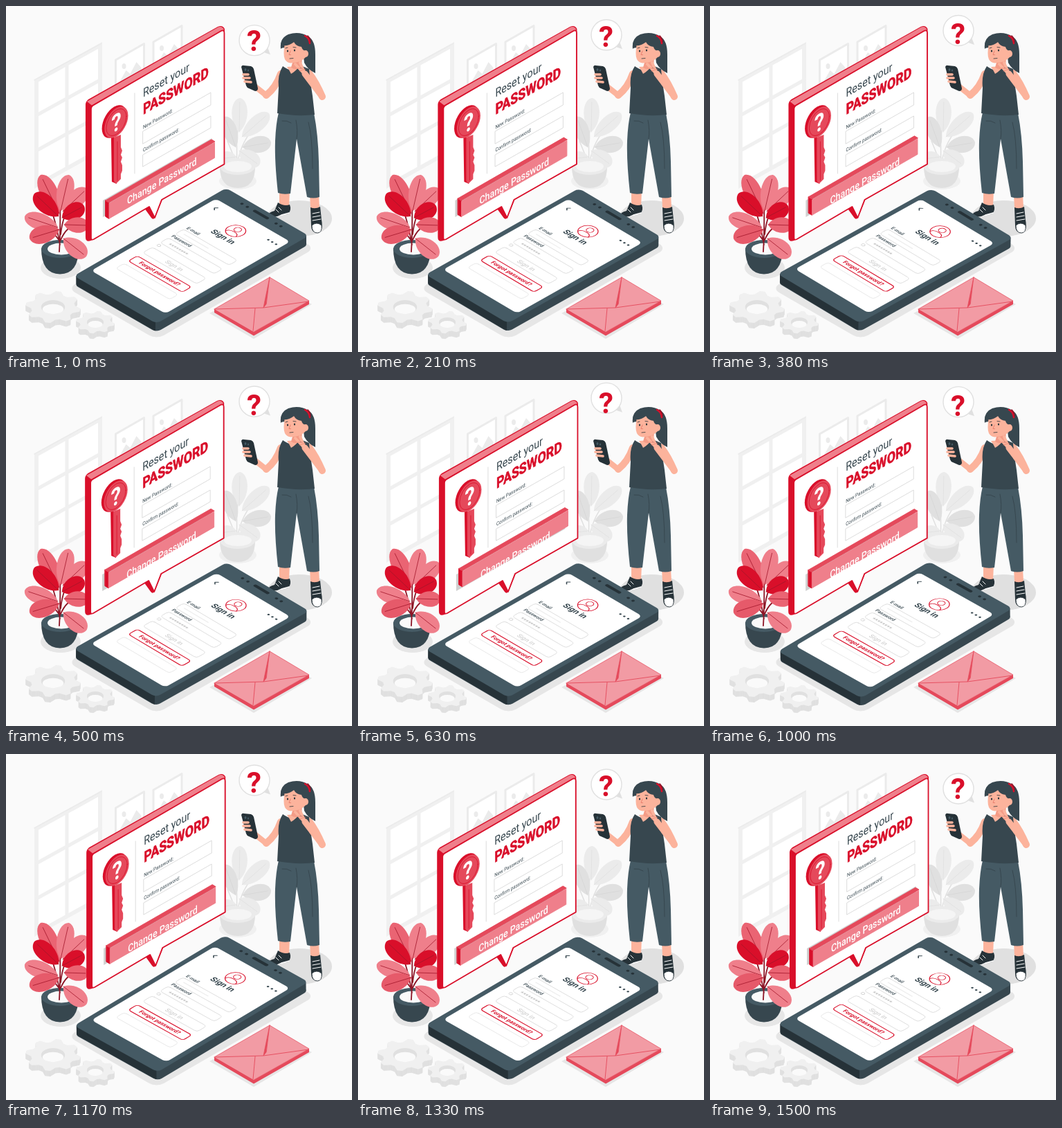
Animation of 500 by 500 pixels, one loop 1540 ms. Source, as an HTML page:

```html
<!DOCTYPE html>
<html lang="en">
<head>
<meta charset="utf-8">
<title>Reset your password</title>
<style>
  html, body { margin: 0; width: 100%; height: 100%; overflow: hidden; background: #fafafa; }
  svg { display: block; width: 100vw; height: 100vh; font-family: Roboto, sans-serif; }
</style>
</head>
<body>
<svg id="stage" viewBox="0 0 500 500" fill="none" stroke-linejoin="round" stroke-linecap="round"></svg>
<script>
const RED = '#d90f2a', ROSE = '#ef7f8b', MID = '#e5495b', SLATE = '#455a64', DARK = '#37474f',
  INK = '#263238', SKIN = '#fcb39c', PALE = '#ebebeb', GREY = '#e0e0e0';

// Isometric planes: the upright card and the ground
const wall = (x, y) => `transform="matrix(.83 -.478 0 1 ${x} ${y})"`;
const floor = (x, y) => `transform="matrix(.866 .5 -.866 .5 ${x} ${y})"`;

const shape = (d, fill, extra = '') => `<path d="${d}" fill="${fill}" ${extra}/>`;
const line = (d, stroke, width = 1) => `<path d="${d}" stroke="${stroke}" stroke-width="${width}"/>`;
const oval = (x, y, rx, ry, fill, extra = '') =>
  `<ellipse cx="${x}" cy="${y}" rx="${rx}" ry="${ry}" fill="${fill}" ${extra}/>`;
const box = (x, y, w, h, r, fill, extra = '') =>
  `<rect x="${x}" y="${y}" width="${w}" height="${h}" rx="${r}" fill="${fill}" ${extra}/>`;
const wallText = (x, y, size, text, fill, weight = 400) =>
  `<text ${wall(x, y)} font-size="${size}" font-weight="${weight}" fill="${fill}">${text}</text>`;
const label = (x, y, size, text, fill, weight = 400, anchor = 'middle') =>
  `<text x="${x}" y="${y}" font-size="${size}" font-weight="${weight}" fill="${fill}" text-anchor="${anchor}">${text}</text>`;

function leaf(x1, y1, x2, y2, w, fill, vein) {
  const dx = x2 - x1, dy = y2 - y1, len = Math.hypot(dx, dy);
  const at = (k, side) => `${x1 + dx * k - dy / len * side} ${y1 + dy * k + dx / len * side}`;
  return shape(`M${x1} ${y1}C${at(.25, w)} ${at(.95, w)} ${x2} ${y2}C${at(.95, -w)} ${at(.25, -w)} ${x1} ${y1}`, fill)
    + line(`M${x1} ${y1}L${at(.88, 0)}`, vein, .8);
}

function gear(cx, cy, r, teeth) {
  const pts = [];
  for (let i = 0; i < teeth * 4; i++) {
    const a = (i + .5) / (teeth * 4) * 2 * Math.PI, k = i % 4 < 2 ? r : r * .8;
    pts.push(`${cx + k * Math.cos(a)} ${cy + k * .58 * Math.sin(a)}`);
  }
  const rim = `M${pts.join('L')}Z`;
  let out = '';
  for (let h = 8; h > 0; h--) out += shape(rim, GREY, `transform="translate(0 ${h})"`);
  return out + shape(rim, '#f0f0f0') + oval(cx, cy, r * .43, r * .25, GREY)
    + oval(cx, cy + 3, r * .38, r * .18, '#fafafa');
}

function picture(x, y) {
  return shape(`M${x} ${y}l41-23.500v60l-41 23.500z`, '#fff', `stroke="${PALE}" stroke-width="3"`)
    + shape(`M${x + 6} ${y + 31}l9-16 6 5 9-17 7 8v20l-31 18z`, PALE)
    + oval(x + 12, y + 9, 3, 4, PALE);
}

const room = () =>
  shape('M44 108L136 57V208L44 259Z', '#fff', `stroke="#f0f0f0" stroke-width="6" stroke-linejoin="miter"`)
  + line('M88 84V234M44 158L136 107M44 209L136 158', '#f0f0f0', 5)
  + line('M41 107L138 54', PALE, 1.500)
  + picture(158.500, 78) + picture(213, 52);

const greyPlant = () =>
  line('M335 236Q331 200 337 165M335 225Q340 195 362 172M335 228Q345 208 365 200M335 232Q326 210 320 195', GREY, 1.500)
  + leaf(337, 182, 338, 133, 15, PALE, GREY) + leaf(341, 189, 380, 155, 15, PALE, GREY)
  + leaf(332, 204, 316, 160, 14, GREY, '#d6d6d6') + leaf(342, 204, 383, 197, 16, GREY, '#d6d6d6')
  + leaf(337, 209, 366, 230, 15, PALE, GREY) + leaf(333, 218, 308, 221, 13, PALE, GREY)
  + oval(335, 253, 27, 12, '#f0f0f0')
  + shape('M309 232Q309 263 335 263Q360 263 360 232Z', GREY)
  + oval(334.500, 232, 25.500, 12, PALE) + oval(335, 232, 20, 8, '#f5f5f5');

const redPlant = () =>
  oval(79, 378, 29, 16, '#e6e6e6')
  + shape('M51 350Q51 387 78 387.500Q105 387 105 350Z', DARK)
  + oval(78, 351, 27, 13, SLATE) + oval(80, 351, 20, 8.500, '#fafafa')
  + line('M77 355Q79 320 78 270M78 345Q72 310 60 278M79 330Q82 300 98 280M78 340Q62 318 46 308M79 338Q88 318 100 318', '#8d1425', 1.800)
  + [[77, 300, 50, 244, 17, '#ea6473'], [79, 296, 91, 244, 16, ROSE], [82, 297, 117, 264, 16, ROSE],
     [76, 304, 41, 271, 17, RED], [81, 306, 113, 289, 16, RED], [75, 320, 27, 304, 16, ROSE],
     [77, 323, 34, 336, 17, '#e65a6a'], [84, 316, 119, 317, 15, '#ea6473'], [83, 336, 116, 362, 17, ROSE]]
    .map(a => leaf(...a, '#a3162a')).join('');

const key = () =>
  shape('M152 190L158 190V250L160 257L153 254Z', RED)
  + `<circle ${wall(156.500, 167)} r="21.500" fill="${RED}"/>`
  + shape('M156 190L166 186V204L168 209L166 215L168 219L166 225L168 230V238L166 243V250L159 257L156 253Z', MID)
  + line('M161 196V252', RED, .8)
  + `<circle ${wall(159.500, 168)} r="20.500" fill="${MID}"/>`
  + `<circle ${wall(159.500, 168)} r="17.500" stroke="${RED}" stroke-width=".8"/>`
  + `<text ${wall(159.500, 180.500)} font-size="35" font-weight="700" text-anchor="middle" fill="#fff">?</text>`;

const card = () =>
  shape('M115 143Q115 138 119 135L306 30Q313 27 316 33V229L226 280L216 305Q213 310 210 306L201 293.500L123 339Q115 342 115 334Z', RED)
  + shape('M117 138L307 30.500Q312 28.500 315 34L124 143.500Z', ROSE)
  + shape('M123 149Q123 145 127 143L311 36Q315.500 34 315.500 39V228.500L225 280L215 306L207 290L127 337Q123 339 123 335Z', '#fff', `stroke="${RED}" stroke-width="1.800"`)
  + line('M186 126V242', '#dcdcdc')
  + line('M198 181L296 125V143L198 199ZM198 215L296 159V176L198 232Z', '#d4d4d4', .8)
  + wallText(198, 132, 17.200, 'Reset your', DARK)
  + `<g stroke="${RED}" stroke-width=".6">${wallText(198, 157, 21.500, 'PASSWORD', RED, 700)}</g>`
  + wallText(198, 178, 7.500, 'New Password:', DARK) + wallText(198, 211, 7.500, 'Confirm password:', DARK)
  + key()
  + shape('M140 281L297.500 191V215L140 305Z', '#d0d0d0')
  + `<g id="button">`
  + shape('M144 281L149 284V307.500L144 304.500Z', RED, `stroke="${RED}"`)
  + shape('M144 281L297 193L302 196L149 284Z', MID, `stroke="${MID}"`)
  + shape('M149.500 285L301.500 197.500V219.500L149.500 307Z', ROSE, `stroke="${ROSE}"`)
  + `</g>` + wallText(175, 287, 15, 'Change Password', '#fff', 500);

const field = (y, h, color, width = .8) => box(26, y, 90, h, 4, 'none', `stroke="${color}" stroke-width="${width}"`);

const phone = () =>
  `<g ${floor(318, 275.500)}>${box(0, 0, 138, 254, 7, DARK)}</g>`
  + shape('M101.500 390L434 332V344.500L216 467L101.500 402.500Z', DARK)
  + shape('M101.500 390L216 457V469.500Q214 469 211 467L104 405Q101.500 404 101.500 401Z', INK)
  + `<g ${floor(318, 263)}>` + box(0, 0, 138, 254, 7, SLATE) + box(7, 24, 124, 208, 6, '#fff') + `</g>`
  + `<g ${floor(318, 261)}>`
  + box(57, 9, 25, 4.500, 2, INK)
  + [38, 47, 95, 103].map(x => oval(x, 11.500, 2, 2, INK)).join('')
  + line('M24 37.500L21 40.500L24 43.500', DARK, 1.300)
  + [112, 118.500, 125].map(x => oval(x, 41.500, 1.500, 1.500, DARK)).join('')
  + `<g stroke="${RED}">` + oval(72, 56, 12, 12, '#fff') + oval(72, 52.500, 4.500, 4.500, 'none')
  + `<path d="M63.500 64Q64 58.500 72 58.500T80.500 64"/></g>`
  + label(70, 79, 11.800, 'Sign in', DARK, 600)
  + label(27, 94, 7, 'E-mail', DARK, 500, 'start') + field(97, 14, '#dadada') + line('M34 104H74', '#eee', 1.500)
  + label(26, 118, 7, 'Password', DARK, 500, 'start') + field(122, 14, '#dadada')
  + label(35, 134, 9, '********', '#b8b8b8', 400, 'start')
  + oval(29, 141, 2.300, 2.300, 'none', 'stroke="#ccc" stroke-width=".7"')
  + field(149, 16, '#dadada') + label(71, 160.500, 9, 'Sign in', '#d2d2d2', 500)
  + field(174, 15, RED, 1.300) + label(70.500, 184, 8.200, 'Forgot password?', RED, 700)
  + field(196, 14, '#e6e6e6')
  + `</g>`;

const envelope = () =>
  shape('M294 444L380 397L442 431L358 481Z', '#e6e6e6')
  + shape('M301 438L358 471L438 426V431L358 476.500L301 443Z', MID)
  + shape('M301 438L381 392L438 426L358 471Z', '#f29ba4', `stroke="${MID}" stroke-width=".7"`)
  + line('M302 438L372 436L437 427M357 470L360 437', MID, .9)
  + shape('M381 392L372 436L376 431Z', MID, `stroke="${MID}" stroke-width=".7"`);

const shoes = () =>
  shape('M393 284Q402 290 410 287Q413 295 408 300L398 302Q388 309 379 303Q379 298 388 296Z', INK)
  + line('M379 303.500Q388 308 398 302L409 299', '#fff', 1.400)
  + line('M390 294L394 298M394 291L398 295', '#fff')
  + shape('M440 291Q447 294 454 290L456 309Q459 326 450 328Q441 328 441 317Z', INK)
  + shape('M442 317Q449 311 456 317Q457 328 450 328Q442 328 442 317Z', '#fff', `stroke="${INK}" stroke-width=".8"`)
  + line('M443 300L453 298M443 305L454 303M443 310L455 308', '#fff');

const head = () =>
  shape('M397 61Q396 46 408 41Q424 36 437 44Q447 50 447 70V97Q436 92 431 82L428 56Z', DARK)
  + shape('M415 78L428 74L427 88Q420 94 412 89Z', '#f49c87')
  + shape('M403 54Q400 71 403 77Q407 84 415 82Q427 81 433 74L431 50Z', SKIN)
  + shape('M397 62Q395 45 411 41Q430 37 437 49Q439 60 433 65Q428 64 427 59Q419 58 416 52Q409 58 402 57Z', DARK)
  + oval(433, 69, 4, 5, SKIN)
  + line('M432 43Q438 46 439 54', RED, 2.500) + line('M436 43Q440 47 440 52', '#9d1024', 1.500)
  + oval(407, 65, 1.100, 1.600, INK) + oval(417, 64, 1.100, 1.600, INK)
  + line('M404 61L407 60M415 59.500L419 60M410 76L415 75.500', INK, .8)
  + line('M411 65L409 70.500H411.500', '#e8806f', 1);

const woman = () =>
  oval(424, 307, 47, 26, '#e0e0e0')
  + shape('M395 266H410L409 290Q401 292 395 285Z', SKIN) + shape('M439 272H452L453 292Q446 296 440 292Z', SKIN) + shoes()
  + shape('M394 154L445 155Q451 185 452 225L453 276Q444 279 435 276L420 192L411 271Q401 273 393 270Q388 225 389 195Q390 170 394 154Z', SLATE)
  + line('M420 192Q422 180 419 165M399 166Q406 165 412 169M437 168Q443 190 443 235', DARK, 1)
  + line('M397 98Q390 118 376 129', SKIN, 10) + line('M376 129L352 110', SKIN, 8)
  + shape('M340 88Q341 85 344 86L354 87Q357 88 358 91L364 119Q364 123 360 123L351 119Q348 118 347 115Z', INK)
  + oval(346, 92, 1.500, 2, SLATE) + oval(350, 93, 1.200, 1.500, SLATE)
  + line('M343 99L350 99M343 104L352 104M345 109L354 110', SKIN, 3.600)
  + line('M438 97Q448 110 457 131', SKIN, 10)
  + shape('M400 87Q407 92 413 93Q420 92 426 86L438 91Q439 105 443 130L446 157Q421 160 392 155L394 118Q392 99 400 87Z', DARK)
  + shape('M406 88Q409 92 412 98Q419 94 424 87Z', SKIN)
  + head()
  + line('M457 131L432 98', SKIN, 9) + line('M430 97L418 84M431 95L425 82', SKIN, 4)
  + line('M421 90L429 90M424 94L433 91', '#e8806f', .7);

const bubble = () =>
  `<g id="bubble">`
  + shape('M372 67L382 70.500L378 60Z', GREY)
  + oval(359, 50, 22, 22, '#fff', `stroke="${GREY}" stroke-width="1.400"`) + `</g>`
  + `<text id="mark" x="358.500" y="65" font-size="42" font-weight="700" text-anchor="middle" fill="${RED}">?</text>`;

const $ = id => document.getElementById(id);
$('stage').innerHTML = room() + greyPlant() + redPlant()
  + `<g ${floor(318, 280)}>${box(-4, -4, 148, 264, 12, '#e6e6e6')}</g>`
  + gear(68, 435, 40, 8) + gear(129, 457, 28, 8)
  + woman() + `<g id="card">${card()}</g><g id="phone">${phone()}</g>` + envelope() + bubble();

const LOOP = 1540, CYCLE = 1500;
const SHAKE = [0, -1, 2, -4, 4, -4, 4, -4, 2, -1, 0], SWAY = [0, 1, 0, -1, 0], LIFT = [0, 1, 0];

// Linear interpolation through evenly spaced values
function track(values, p) {
  const s = p * (values.length - 1), i = Math.min(Math.floor(s), values.length - 2);
  return values[i] + (values[i + 1] - values[i]) * (s - i);
}

const move = (id, x, y) => $(id).setAttribute('transform', `translate(${x} ${y})`);

function draw(now) {
  const p = Math.min((now % LOOP + 8) / CYCLE, 1), lift = track(LIFT, p);
  move('card', track(SHAKE, p), 0);
  move('button', 0, -10 * lift);
  move('bubble', 0, -28 * lift);
  move('mark', 0, -20 * lift);
  $('phone').setAttribute('transform', `rotate(${track(SWAY, p)} 268 368)`);
  requestAnimationFrame(draw);
}
draw(performance.now());
</script>
</body>
</html>
```
